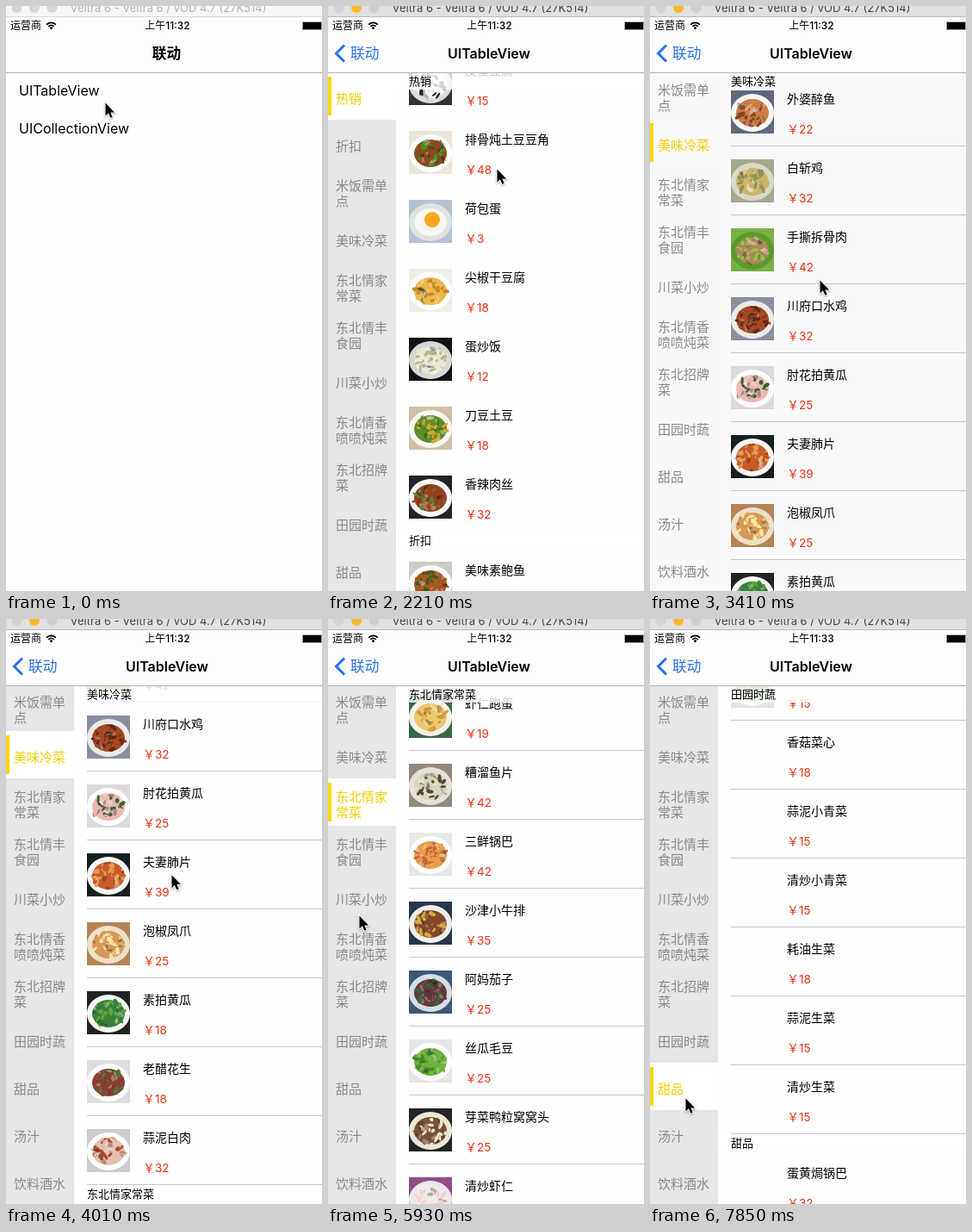
Animation of 367x679 px, one loop 7990 ms. Source, as an HTML page with a canvas:

```html
<!DOCTYPE html>
<html lang="zh">
<head>
<meta charset="utf-8">
<title>联动</title>
<style>
html, body { margin: 0; width: 100%; height: 100%; overflow: hidden; background: #fff; }
canvas { display: block; }
</style>
</head>
<body>
<canvas id="stage" width="367" height="679"></canvas>
<script>
const W = 367, H = 679, TOP = 77, PHONE = 375;
const LOOP = 7990, TICKS = 54, STEP = LOOP / TICKS;
const ROW = 80, HEAD = 20, MENU_ROW = 55, MENU_W = 79;
const FONT = 'Inter, "Noto Sans CJK SC", "Noto Sans CJK", sans-serif';
const BLUE = '#2672f0';
const ctx = document.getElementById('stage').getContext('2d');

// Each dish: name, price, then table, plate, food and accent colours; "o" puts the accent in the middle.
const hot = `东北大拉皮 18 #b32a2a #f4f0ea #cc9a4a #5a9a38
芹菜肉水饺 18 #9fb0b4 #e9ebe4 #d6d6c0 #a9ac90
干煸豆角 22 #c04068 #f4f4f0 #4a2418 #8c2c28
皮蛋豆腐 15 #303234 #d8dce0 #f4f4f2 #26282c
排骨炖土豆豆角 48 #ece6d8 #fff #8a4a20 #4a9020
荷包蛋 3 #b4c2d2 #dfe2e2 #f8f6f0 #f9a51c o
尖椒干豆腐 18 #f0eee8 #fff #ecb84e #c88a24
蛋炒饭 12 #121212 #d6d8d2 #e8e6d4 #b4b888
刀豆土豆 18 #d0c0a8 #f8f6f0 #5a9028 #d8a030
香辣肉丝 32 #202428 #f8f8f6 #984020 #5c8030`;
const deals = `美味素鲍鱼 28 #c8ccc4 #fff #a85820 #386020
五香豆干 16 #ddd #fff #8a5a30 #5a8030
凉拌木耳 18 #ccc #fff #3a2c28 #608038
糖醋藕片 18 #ddd #fff #d8a878 #b05030`;
const rice = '白米饭 2 #bcc4cc #fff #f4f4f0 #e4e4dc';
const cold = `外婆醉鱼 22 #60687c #f8f6f4 #cc7c48 #8a4428
白斩鸡 32 #a8a890 #d8d8c8 #ccb468 #8c9858
手撕拆骨肉 42 #78b044 #5a9a2c #a88858 #98c050
川府口水鸡 32 #8890a0 #eceae8 #a44824 #642414
肘花拍黄瓜 25 #dcd8dc #fff #ecb8b4 #386034
夫妻肺片 39 #16201c #faf8f4 #c85c28 #e89c50
泡椒凤爪 25 #b48458 #eee0c8 #d89858 #f8e898
素拍黄瓜 18 #202420 #f6f8f4 #38803c #5aa838
老醋花生 18 #ddd #fff #8a4030 #5a7038
蒜泥白肉 32 #ccc #fff #e8c0b0 #a84828`;
const home = `松子桂鱼 108 #e8e4e0 #fff #d84c28 #e88c50
清蒸多宝鱼 88 #a83c34 #f8f8f4 #a87848 #64482c
清蒸鲈鱼 58 #14120e #ece4c8 #a87830 #645030
辣炒花蛤 35 #9498a8 #d8d0c8 #b88c58 #74583c
葱姜花蛤 35 #a8b0bc #dce8f0 #64482c #342418
荷芹炒辣味 29 #5cb440 #f8f8f4 #a85834 #488028
干炸蚕蛹 52 #c89448 #b47828 #643818 #944c20
开边蚕蛹 52 #402818 #f8f4ec #54301c #804828
虾仁跑蛋 19 #386848 #f4f2ec #ecc868 #d89c3c
糟溜鱼片 42 #94887c #e4e2dc #d8d4b8 #54483c
三鲜锅巴 42 #e8e8e4 #fff #e89c4c #c8683c
沙津小牛排 35 #28384c #f0f0ec #844824 #d8a848
阿妈茄子 25 #3c5878 #d8dce4 #64383c #386838
丝瓜毛豆 25 #e4e8e4 #fff #6cb43c #488830
芽菜鸭粒窝窝头 25 #242424 #ece8d8 #785038 #f4e4c4
清炒虾仁 38 #944c88 #ece8f0 #f0e8e4 #f4cccc`;
const greens = `蒜蓉油麦菜 18
清炒油麦菜 15
蒜泥菠菜 15
清炒菠菜 15
蒜泥空心菜 15
清炒空心菜 15
手撕包菜 18
清炒豆苗 15
香菇菜心 18
蒜泥小青菜 15
清炒小青菜 15
耗油生菜 18
蒜泥生菜 15
清炒生菜 15`;
const sweets = `蛋黄焗锅巴 32
拔丝地瓜 28
南瓜饼 18`;

const parse = s => s.split('\n').map(line => {
  const [name, price, ...look] = line.split(' ');
  return { name, price, look: look.length ? look : ['#dfe6da', '#fff', '#6a9a48', '#a8c878'] };
});
const pool = parse(home);
const sections = [
  ['热销', parse(hot)], ['折扣', parse(deals)], ['米饭需单点', parse(rice)],
  ['美味冷菜', parse(cold)], ['东北情家常菜', pool],
  ['东北情丰食园', pool.slice(0, 6)], ['川菜小炒', pool.slice(4, 10)],
  ['东北情香喷喷炖菜', pool.slice(8, 14)], ['东北招牌菜', pool.slice(10)],
  ['田园时蔬', parse(greens)], ['甜品', parse(sweets)], ['汤汁', []], ['饮料酒水', []]
].map(([name, rows]) => ({ name, rows }));
let end = 0;
for (const s of sections) {
  s.top = end;
  end += HEAD + s.rows.length * ROW;
}

// Keys are [tick, value, ...].
const slideKeys = [[5, 1], [6, .72], [7, .24], [8, .05], [9, .01], [10, 0]];
const scrollKeys = [[12, 0], [15, 287], [18, 640], [22, 1262], [23, 1274], [24, 1277], [27, 1500],
  [32, 2125], [36, 2640], [39, 2740], [40, 2744], [45, 2744], [46, 4140], [47, 5380], [52, 5380], [53, 5999]];
const menuKeys = [[19, 0], [20, 40], [21, 55], [22, 90], [23, 111], [24, 112]];
const cursorKeys = [[0, 115, 112], [1, 115, 105], [6, 115, 105], [7, 116.5, 104], [8, 117, 104],
  [11, 200, 440], [12, 199, 460], [15, 196, 189], [16, 196, 170], [18, 198, 460], [21, 196, 190],
  [23, 197, 318], [25, 196, 470], [28, 190, 210], [30, 172, 470], [32, 171, 351], [34, 170, 200],
  [37, 130, 260], [40, 36, 344], [43, 38, 490], [48, 38, 490], [50, 41, 556]];

function at(keys, t) {
  let i = 0;
  while (i < keys.length - 1 && keys[i + 1][0] <= t) i++;
  const a = keys[i], b = keys[i + 1] || a;
  const f = b === a ? 0 : Math.max(0, (t - a[0]) / (b[0] - a[0]));
  return a.slice(1).map((v, k) => v + (b[k + 1] - v) * f);
}

function rect(x, y, w, h, color) {
  ctx.fillStyle = color;
  ctx.fillRect(x, y, w, h);
}

function oval(x, y, rx, ry, color, turn = 0) {
  ctx.fillStyle = color;
  ctx.beginPath();
  ctx.ellipse(x, y, rx, ry, turn, 0, 7);
  ctx.fill();
}

// y is the optical middle of the line.
function text(s, x, y, size, color, weight = 400, align = 'left') {
  ctx.font = `${weight} ${size}px ${FONT}`;
  ctx.fillStyle = color;
  ctx.textAlign = align;
  ctx.fillText(s, x, y + size * .37);
}

function faded(alpha, draw) {
  ctx.save();
  ctx.globalAlpha = alpha;
  draw();
  ctx.restore();
}

function rng(seed) {
  return () => (seed = (seed * 16807) % 2147483647) / 2147483647;
}

function thumb(dish, x, y) {
  const [cloth, plate, food, accent, centred] = dish.look;
  const rnd = rng(dish.name.charCodeAt(0) * 31 + dish.name.charCodeAt(1));
  const tones = [food, accent, 'rgba(0,0,0,.25)', food, accent, 'rgba(255,255,255,.3)'];
  ctx.save();
  ctx.beginPath();
  ctx.rect(x, y, 50, 50);
  ctx.clip();
  rect(x, y, 50, 50, cloth);
  oval(x + 25, y + 26, 25, 22, plate);
  oval(x + 25, y + 26, 19, 16, food);
  if (centred) {
    oval(x + 27, y + 23, 9, 9, accent);
  } else {
    for (let i = 0; i < 48; i++) {
      const a = rnd() * 6.3, r = Math.sqrt(rnd());
      oval(x + 25 + 18 * r * Math.cos(a), y + 26 + 15 * r * Math.sin(a),
        1.5 + rnd() * 3.5, 1 + rnd() * 1.5, tones[i % 6], a * 2);
    }
  }
  ctx.restore();
}

function drawHome(slide, pressed) {
  const x = -112 * (1 - slide);
  rect(0, TOP, W, H - TOP, '#fefefe');
  if (pressed) rect(x, TOP, PHONE, 44, '#dedede');
  text('UITableView', x + 15, 98.5, 16, '#000');
  text('UICollectionView', x + 15, 142.5, 16, '#000');
  rect(0, TOP, W, H - TOP, `rgba(0,0,0,${.11 * (1 - slide)})`);
}

function drawMenu(x, offset, selected, pale) {
  rect(x - 1, TOP, MENU_W + 1, H - TOP, pale ? '#f8f8f8' : '#e6e6e6');
  sections.forEach(({ name }, i) => {
    const y = TOP + i * MENU_ROW - offset, on = i === selected;
    if (on) {
      rect(x - 1, y, MENU_W + 1, MENU_ROW, pale ? '#fafafa' : '#fff');
      rect(x - 1, y + 5, 5, 45, '#ffd400');
    }
    const lines = name.length > 4 ? [name.slice(0, 4), name.slice(4)] : [name];
    lines.forEach((line, k) => {
      const dy = lines.length > 1 ? k * 18 - 9 : 0;
      text(line, x + 9, y + 30 + dy, 15, on ? '#f4d000' : '#8a8a8a');
    });
  });
}

function drawDishes(x, scroll, t, pale) {
  const ruled = !(t === 7 || (t > 12 && t < 22) || (t > 27 && t < 37));
  const loaded = (s, i) => s < 5 || (s === 9 && i < 8 && t >= 47 + i * .4);
  rect(x + MENU_W, TOP, PHONE, H - TOP, pale ? '#f9f9f9' : '#fefefe');
  sections.forEach((sec, s) => {
    const top = Math.round(TOP + sec.top - scroll);
    const bottom = top + HEAD + sec.rows.length * ROW;
    if (bottom <= TOP || top > H) return;
    sec.rows.forEach((dish, i) => {
      const y = top + HEAD + i * ROW;
      if (y > H || y + ROW < TOP) return;
      if (loaded(s, i)) thumb(dish, x + 94, y + 15);
      text(dish.name, x + 159, y + 24.7, 14, '#000');
      text('￥', x + 159, y + 59.8, 14, '#f03010');
      text(dish.price, x + 173, y + 59.8, 13.5, '#f03010');
      if (ruled) rect(x + 94, y + ROW - 1, PHONE, 1, '#c8c8cb');
    });
    const y = Math.min(Math.max(TOP, top), bottom - HEAD);
    rect(x + MENU_W, y, PHONE, HEAD, pale ? 'rgba(249,249,249,.8)' : 'rgba(255,255,255,.8)');
    text(sec.name, x + 94, y + 10, 13, '#000');
  });
}

function drawWindowBar(active) {
  rect(0, 0, W, 12, active ? '#e0e0e0' : '#f6f6f6');
  rect(0, 12, W, 1, active ? '#b8b8b8' : '#d8d8d8');
  const lights = active ? ['#d2d2d2', '#fdb92c', '#cecece'] : ['#d6d6d6', '#d6d6d6', '#d6d6d6'];
  lights.forEach((c, i) => oval(12.5 + i * 20.5, 2, 6, 6, c));
  text('Veltra 6 - Veltra 6 / vOD 4.7 (27K514)', 188.5, 2.5, 13, active ? '#484848' : '#b4b4b4', 400, 'center');
}

function drawStatus(clock) {
  text('运营商', 5, 23, 12, '#000');
  ctx.strokeStyle = '#000';
  ctx.lineWidth = 1.7;
  for (const r of [4.6, 7.6]) {
    ctx.beginPath();
    ctx.arc(52.5, 27, r, -Math.PI * .75, -Math.PI * .25);
    ctx.stroke();
  }
  ctx.fillStyle = '#000';
  ctx.beginPath();
  ctx.moveTo(52.5, 27.5);
  ctx.arc(52.5, 27, 2.6, -Math.PI * .75, -Math.PI * .25);
  ctx.fill();
  text(clock, 187.5, 23, 12, '#000', 500, 'center');
  ctx.strokeStyle = '#a0a0a0';
  ctx.lineWidth = 1;
  ctx.strokeRect(344.5, 18.5, 22, 9);
  rect(345, 19, 21, 8, '#000');
}

function drawNav(p) {
  rect(0, 13, W, TOP - 13, '#fdfdfd');
  rect(0, TOP, W, 1, '#b0b0b2');
  if (p > 0) {
    faded(p * p, () => text('联动', 186.5 - 144 * (1 - p), 55, 16.7, '#000', 600, 'center'));
  }
  if (p === 1) return;
  faded((1 - p) ** 6, () => {
    ctx.strokeStyle = BLUE;
    ctx.lineWidth = 3;
    ctx.beginPath();
    ctx.moveTo(19, 45.5);
    ctx.lineTo(9.5, 55);
    ctx.lineTo(19, 64.5);
    ctx.stroke();
  });
  faded(1 - p, () => {
    text('联动', 26 + 164 * p, 55, 16.7, BLUE);
    text('UITableView', 187 + 267 * p, 55, 16, '#000', 600, 'center');
  });
}

function drawCursor(x, y) {
  const arrow = [[0, 0], [0, 15], [3.4, 11.8], [5.8, 17.2], [8.2, 16.2], [5.9, 10.9], [10.6, 10.9]];
  ctx.save();
  ctx.translate(x + .5, y + .5);
  ctx.beginPath();
  arrow.forEach(([px, py]) => ctx.lineTo(px, py));
  ctx.closePath();
  ctx.shadowColor = 'rgba(0,0,0,.35)';
  ctx.shadowBlur = 2;
  ctx.shadowOffsetY = 1;
  ctx.strokeStyle = '#fff';
  ctx.lineWidth = 2;
  ctx.stroke();
  ctx.shadowColor = 'transparent';
  ctx.fillStyle = '#000';
  ctx.fill();
  ctx.restore();
}

function selectedAt(t, scroll) {
  if (t >= 52) return 10;
  if (t >= 45) return 9;
  return sections.findLastIndex(s => s.top <= scroll);
}

function draw(t) {
  const [slide] = at(slideKeys, t);
  const [scroll] = at(scrollKeys, t);
  const [menu] = at(menuKeys, t);
  const active = t >= 5, pale = t >= 23 && t <= 25;
  const x = Math.round(slide * PHONE);
  if (slide > 0) drawHome(slide, active);
  if (slide < 1) {
    drawDishes(x, scroll, t, pale);
    drawMenu(x, menu, selectedAt(t, scroll), pale);
  }
  drawNav(slide);
  drawStatus(t < 42 ? '上午11:32' : '上午11:33');
  drawWindowBar(active);
  drawCursor(...at(cursorKeys, t));
}

const start = performance.now();
function loop() {
  const ms = (performance.now() - start) % LOOP;
  draw(Math.min(TICKS - 1, Math.floor((ms + 10) / STEP)));
  requestAnimationFrame(loop);
}
loop();
</script>
</body>
</html>
```
